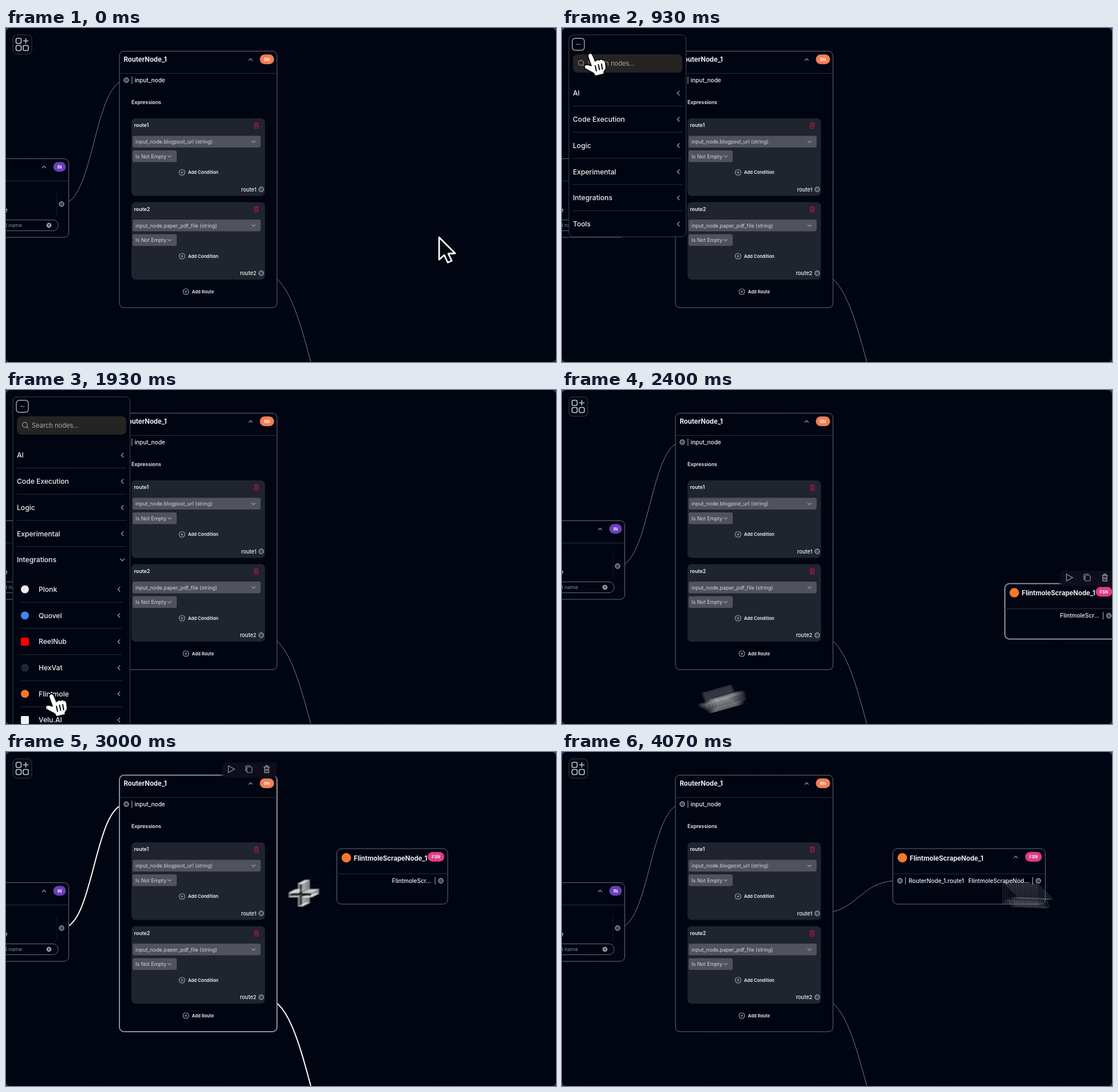
Write an HTML page that moves like this. It is 960 px wide and 584 px high and loops after 4.14 s.

```html
<!DOCTYPE html>
<html lang="en">
<head>
<meta charset="utf-8">
<title>Node editor</title>
<style>
  html, body { margin: 0; width: 100%; height: 100%; overflow: hidden; }
  body { background: linear-gradient(#234a82, #2b2e3c); }
  svg { display: block; font-family: Inter, "Liberation Sans", sans-serif; }
  text { fill: #f1f2f4; white-space: pre; }
  .title { font-size: 11.3px; font-weight: 650; }
  .port { font-size: 10px; font-weight: 550; }
  .bold { font-size: 8.8px; font-weight: 600; }
  .field { font-size: 8.95px; fill: #d3d5d9; }
  .add { font-size: 7.7px; font-weight: 600; }
  .menu { font-size: 12.1px; font-weight: 450; }
  .badge { font-size: 7.4px; font-weight: 700; text-anchor: middle; }
  .end { text-anchor: end; }
  .box { fill: #010512; stroke: #666b74; }
  .sel .box { stroke: #8b9098; stroke-width: 2; }
  .bar { display: none; }
  .sel .bar { display: inline; }
  .line { fill: none; stroke: #292e37; }
  .icon { fill: none; stroke: #959aa3; stroke-width: 1.2; stroke-linecap: round; stroke-linejoin: round; }
  #launcher .icon { stroke: #c3c7cd; stroke-width: 1.6; }
  .edge { fill: none; stroke: #777b83; }
  .edge.on { stroke: #fff; stroke-width: 2; }
</style>
</head>
<body>
<svg id="stage" width="960" height="584" viewBox="0 0 960 584"></svg>
<script>
const LOOP = 4140, SHUTTER = 13, COPIES = 16;
const OPEN = 760, EXPAND = 1330, ADD = 2200, GRAB = 2600, DROP = 2740,
      ROUTE = 2880, CONNECT = 3120, RELEASE = 3900;

const text = (x, y, cls, s) => `<text x="${x}" y="${y}" class="${cls}">${s}</text>`;
const rect = (x, y, w, h, r, attrs) => `<rect x="${x}" y="${y}" width="${w}" height="${h}" rx="${r}" ${attrs}/>`;
const path = (d, cls = 'icon', attrs = '') => `<path d="${d}" class="${cls}" ${attrs}/>`;
const at = (x, y, s) => `<g transform="translate(${x} ${y})">${s}</g>`;
const chevron = (x, y, turn = 0, size = 1) =>
  `<path d="M-3 -1.5L0 1.5L3 -1.5" class="icon" transform="translate(${x} ${y}) rotate(${turn}) scale(${size})"/>`;
const port = (x, y) => `<circle cx="${x}" cy="${y}" r="4.1" fill="#42464e" stroke="#a6aab0" stroke-width="1.2"/>`;
const tick = (x, y) => path(`M${x} ${y - 6}v12`, 'icon', 'stroke-width="1"');
const badge = (x, y, s, color, w = 25) =>
  rect(x - w / 2, y - 8.5, w, 17, 8.5, `fill="${color}"`) + text(x, y + 2.7, 'badge', s);
const trash = (x, y, color) =>
  path(`M${x - 4} ${y - 3}h8M${x - 1.5} ${y - 3}v-2h3v2M${x - 3} ${y - 3}v8h6v-8M${x - 1} ${y - .5}v3M${x + 1} ${y - .5}v3`,
    'icon', `style="stroke:${color}"`);
const plusButton = (x, y, s) =>
  `<circle cx="${x}" cy="${y}" r="5" class="icon"/>` + path(`M${x - 2} ${y}h4M${x} ${y - 2}v4`) + text(x + 10.5, y + 2.8, 'add', s);

// Toolbar placed by the top right corner of its node.
const toolbar = (x, y) => `<g class="bar">` +
  rect(x - 97, y - 22, 96, 27, 5, 'fill="#0c111b" filter="url(#soft)"') +
  at(x - 81, y - 10, path('M-5 -6L6 0L-5 6Z')) +
  at(x - 50, y - 10, rect(-3.5, -4, 9, 10, 2, 'class="icon"') + path('M-5.5 3.5V-4.5Q-5.5 -6 -4 -6H2.5')) +
  at(x - 19, y - 10, `<g transform="scale(1.2)">${trash(0, 0, '#959aa3')}</g>`) + `</g>`;

const route = (y, name, field) => at(0, y,
  rect(219, 158, 233, 135.5, 7, 'fill="#1f242e"') +
  text(223.5, 173.3, 'bold', name) + trash(437, 170.5, '#b51746') +
  rect(221, 188.5, 223.5, 20.5, 3, 'fill="#50535b"') +
  text(226, 202, 'field', field) + chevron(432, 199) +
  rect(221, 214, 77, 20.5, 3, 'fill="#50535b"') +
  text(226, 227.6, 'field', 'Is Not Empty') + chevron(285.5, 224.5) +
  plusButton(307.3, 252.5, 'Add Condition') +
  `<text x="437" y="285.5" class="port end" style="font-size:9.2px">${name}</text>` + port(445.5, 282.3));

const menuRow = (y, s) => text(19, y + 4.3, 'menu', s) + chevron(203, y, 90, 1.15);
const subRow = ([s, color, round], i) => {
  const y = 348.5 + i * 45.7;
  return rect(26, y - 7, 14, 14, round ? 7 : 2, `fill="${color}"`) +
    text(57, y + 4.3, 'menu', s) + chevron(197, y, 90, 1.15) + path(`M25 ${y + 22.7}H203`, 'line');
};
const groups = ['AI', 'Code Execution', 'Logic', 'Experimental', 'Integrations'];
const services = [['Plonk', '#eee9ec', 1], ['Quovel', '#4285f4', 1], ['ReelNub', '#f00', 0],
  ['HexVat', '#20262f', 1], ['Flintmole', '#f5782c', 1], ['Velu.AI', '#f2f2f2', 0]];

const inputNode = rect(-30, 228.5, 139.5, 137.5, 8, 'class="box"') + path('M0 267.5H109', 'line') +
  chevron(66.5, 243, 180) + badge(93.5, 242.8, 'IN', '#6a3fbe', 22) +
  text(-3.2, 322, 'port', 'e') + path('M89 287v42', 'line', 'stroke-opacity=".6"') +
  rect(-30, 335.5, 121, 19, 9, 'class="box"') +
  `<text x="28" y="348.2" class="end" style="font-size:9px;fill:#858a93">d name</text>` +
  `<circle cx="75" cy="345" r="4.3" fill="#a5a9af"/>` + path('M73.5 343.5l3 3m0 -3l-3 3', 'icon', 'style="stroke:#111722"') +
  port(97, 308);

const routerNode = `<g id="router">` + rect(198, 40.5, 275, 448.5, 8, 'class="box"') + toolbar(474, 40) +
  path('M198 79.5H473', 'line') + text(205.5, 59, 'title', 'RouterNode_1') +
  chevron(427, 55, 180) + badge(455.5, 54.8, 'RN', '#f77d51') +
  port(210, 91.3) + tick(219.8, 91.3) + text(224.5, 95, 'port', 'input_node') + text(219, 133.3, 'bold', 'Expressions') +
  route(0, 'route1', 'input_node.blogpost_url (string)') + route(146.5, 'route2', 'input_node.paper_pdf_file (string)') +
  plusButton(314, 461, 'Add Route') + `</g>`;

const scrapeBody = (w, extra) => rect(.5, .5, w, 97, 8, 'class="box"') + toolbar(w + .5, 0) +
  path(`M0 44.5H${w}`, 'line') + `<circle cx="17" cy="16.5" r="8.3" fill="#f5782c"/>` +
  text(30, 21, 'title', 'FlintmoleScrapeNode_1') + badge(w - 20, 14.8, 'FSN', '#df3b86', 29) +
  port(w - 11.5, 56.7) + tick(w - 21.5, 56.7) + extra;
const scrapeNode = `<g id="scrape"><g id="narrow">` +
  scrapeBody(193.5, text(165, 60, 'port end', 'FlintmoleScr...')) + `</g><g id="wide">` +
  scrapeBody(266, chevron(215, 15, 180) + port(13, 56.7) + tick(22.5, 56.7) +
    text(28, 60, 'port', 'RouterNode_1.route1') + text(238.5, 60, 'port end', 'FlintmoleScrapeNod...')) + `</g></g>`;

const launcher = `<g id="launcher">` + rect(12, 12, 33, 34, 7, 'fill="#050a14" stroke="#353c47"') +
  [[17.5, 18], [17.5, 30.5], [30, 30.5]].map(([x, y]) => rect(x, y, 9, 9, 2.5, 'class="icon"')).join('') +
  path('M34.5 18.5v8M30.5 22.5h8') + `</g>`;

const menu = `<g id="menu"><rect id="panel" x="12" y="12" width="204.5" rx="8" fill="#010512" stroke="#3b424d"/>` +
  rect(18, 18, 21, 21, 5, 'fill="none" stroke="#a8adb4" stroke-width="1.4"') + path('M25 28.5h7') +
  rect(19, 46, 191, 32, 8, 'fill="#252423"') + `<circle cx="33" cy="61" r="4.3" class="icon"/>` + path('M36.2 64.2l3 3') +
  `<text x="45" y="66.2" style="font-size:11.1px;fill:#a7a9ac">Search nodes...</text>` +
  groups.slice(0, 4).map((s, i) => menuRow(114 + i * 45.75, s) + path(`M19 ${136.5 + i * 45.75}H210`, 'line')).join('') +
  text(19, 301.3, 'menu', groups[4]) + `<g transform="translate(203 297)"><g id="arrow">${chevron(0, 0, 0, 1.15)}</g></g>` +
  `<g clip-path="url(#fold)">${services.map(subRow).join('')}</g>` +
  `<g id="tools">${path('M19 319.5H210', 'line')}${menuRow(342.7, 'Tools')}</g></g>`;

stage.innerHTML = `<defs>
  <pattern id="dots" width="15" height="15" patternUnits="userSpaceOnUse"><circle cx="7" cy="8" r=".7" fill="#1b222d"/></pattern>
  <filter id="soft" x="-20%" y="-50%" width="140%" height="200%"><feGaussianBlur stdDeviation="2"/></filter>
  <clipPath id="fold"><rect id="foldBox" x="12" y="320" width="204" height="0"/></clipPath>
  <g id="pointer" stroke-linejoin="round"><path d="M1 2V41L10 33L16 46L23 43L17 30.5L29 30Z" fill="#05070c" stroke="#fff" stroke-width="2.8"/></g>
  <g id="hand" stroke="#06080c" stroke-linejoin="round" stroke-linecap="round">
    <path d="M-2 1Q1 -3 5 1L10 13Q14 9 17 11Q21 8 23 11Q27 10 28 16L29 26L25 32L26 35L10 39L7 34L-8 26Q-11 19 -4 19L3 21L-3 4Z" fill="#fff" stroke-width="1.8"/>
    <path d="M10 21l2 9M15.5 19l2 9M21 18l1.5 9" fill="none" stroke-width="2"/></g>
  <g id="cross"><path d="M-21 0H21M0 -21V21" stroke="#fff" stroke-width="10"/><path d="M-18 0H18M0 -18V18" stroke="#05070c" stroke-width="4"/></g>
</defs>` +
  rect(0, 0, 960, 584, 8, 'fill="#010512"') + rect(0, 0, 960, 584, 8, 'fill="url(#dots)"') +
  `<path id="inEdge" d="M97 308C153.5 308 153.5 91 210 91"/>
   <path id="outEdge" d="M449 429C532 429 532 740 616 740"/>
   <path id="newEdge" d="M449 282C518 282 518 225 587 225"/>` +
  inputNode + routerNode + scrapeNode + launcher + menu +
  `<g id="cursor">${'<use/>'.repeat(COPIES)}</g>`;

const byId = id => document.getElementById(id);
const show = (id, on) => { byId(id).style.display = on ? '' : 'none'; };
const within = (t, a, b) => t >= a && t < b;
const clamp = v => Math.min(1, Math.max(0, v));
const ease = v => v * v * (3 - 2 * v);
const mix = (a, b, v) => a + (b - a) * v;
const edge = (id, on) => byId(id).setAttribute('class', on ? 'edge on' : 'edge');

// Cursor stops: time, x, y
const stops = [[0, 755, 364], [120, 755, 364], [620, 32, 30], [780, 48, 45], [950, 48, 45],
  [1280, 78, 302], [1560, 78, 302], [1850, 78, 532], [2150, 78, 532], [2305, 80, 575],
  [2580, 840, 360], [GRAB, 840, 360], [DROP, 644.5, 190.5], [2760, 644.5, 190.5], [ROUTE, 446, 284],
  [2885, 446, 284], [3091, 581, 216], [3990, 581, 216], [4150, 1065, 238]];

function cursorAt(t) {
  const i = Math.max(1, stops.findIndex(s => s[0] > t));
  const [t0, x0, y0] = stops[i - 1], [t1, x1, y1] = stops[i];
  const v = ease(clamp((t - t0) / (t1 - t0)));
  return [mix(x0, x1, v), mix(y0, y1, v)];
}

// Fast moves smear the cursor over the shutter time.
function drawCursor(t) {
  const kind = t < 650 || t >= RELEASE ? 'pointer' : t < ROUTE ? 'hand' : 'cross';
  const [x, y] = cursorAt(t), [px, py] = cursorAt(Math.max(0, t - SHUTTER));
  const smear = Math.hypot(x - px, y - py);
  [...byId('cursor').children].forEach((copy, i) => {
    const v = i / (COPIES - 1);
    copy.setAttribute('href', '#' + kind);
    copy.setAttribute('transform', `translate(${mix(x, px, v)} ${mix(y, py, v)})`);
    copy.setAttribute('opacity', smear > 2 ? Math.min(.2, 5 / smear) : i ? 0 : 1);
  });
}

function draw(t) {
  const open = within(t, OPEN, ADD), unfolded = ease(clamp((t - EXPAND) / 130)) * 275;
  show('menu', open);
  show('launcher', !open);
  byId('panel').setAttribute('height', 353 + unfolded);
  byId('foldBox').setAttribute('height', unfolded);
  byId('tools').setAttribute('transform', `translate(0 ${unfolded})`);
  byId('arrow').setAttribute('transform', `rotate(${90 - unfolded / 275 * 90})`);

  const routing = within(t, ROUTE, CONNECT), linked = t >= CONNECT;
  const chosen = within(t, ADD, ROUTE) || within(t, CONNECT, RELEASE);
  const drag = ease(clamp((t - GRAB) / (DROP - GRAB)));
  byId('router').setAttribute('class', routing ? 'sel' : '');
  byId('scrape').setAttribute('class', chosen ? 'sel' : '');
  byId('scrape').setAttribute('transform', `translate(${mix(772.5, 577, drag)} ${mix(338, 168.5, drag)})`);
  show('scrape', t >= ADD);
  show('narrow', !linked);
  show('wide', linked);
  show('newEdge', linked);
  edge('inEdge', routing);
  edge('outEdge', routing);
  edge('newEdge', chosen);
  drawCursor(t);
}

function tickFrame() {
  draw(performance.now() % LOOP);
  requestAnimationFrame(tickFrame);
}
tickFrame();
</script>
</body>
</html>
```
